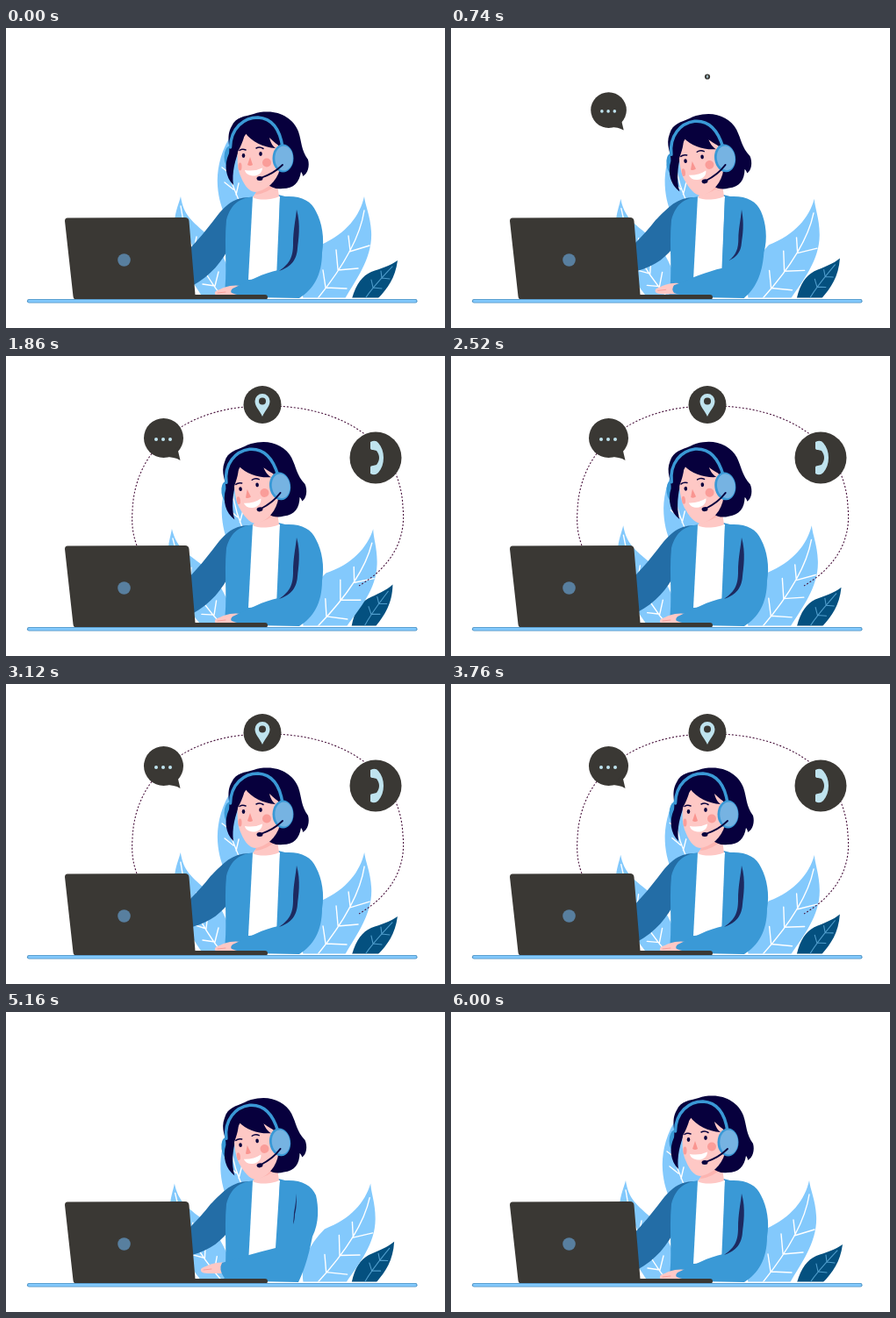
These frames come from a looping animation (500x342 px, 6020 ms). An HTML page:

```html
<!DOCTYPE html>
<html lang="en">
<head>
<meta charset="utf-8">
<title>Support agent</title>
<style>
  html, body { margin: 0; width: 100%; height: 100%; overflow: hidden; background: #fff; }
  svg { display: block; width: 100vw; height: 100vh; }
  .pale { fill: #83c9fc; }
  .vein { fill: none; stroke: #fff; stroke-width: 1.4; stroke-linecap: round; }
  .navy { fill: #07003d; }
  .blue { fill: #3a99d6; }
  .shade { fill: #236da6; }
  .skin { fill: #fec8c5; }
  .blush { fill: #f99590; }
  .dark { fill: #3a3834; }
  .ice { fill: #bfe3ee; }
  .line { fill: none; stroke-linecap: round; }
</style>
</head>
<body>
<svg viewBox="0 0 500 342">
  <defs>
    <clipPath id="ground"><rect width="500" height="307.5"/></clipPath>
    <path id="arc" d="M149 216C144 203 143 190 144 176C147 100 212 56 296 57C384 56 449 100 452 172C456 207 441 239 402 262"/>
    <mask id="reveal" maskUnits="userSpaceOnUse" x="0" y="0" width="500" height="342">
      <use id="wipe" href="#arc" fill="none" stroke="#fff" stroke-width="6"/>
    </mask>
  </defs>

  <g clip-path="url(#ground)">
    <g id="leafDark">
      <path fill="#04507f" d="M446 265C443 288 432 300 420 312H393C398 293 405 283 416 278C427 274 438 271 446 265Z"/>
      <path class="vein" style="stroke:#4f9ccb;stroke-width:1.1" d="M440 272C427 286 417 296 408 310M428 285L427 277M428 285L437 286M418 296L416 287M418 296L428 297"/>
    </g>
    <g id="leafRight">
      <path class="pale" d="M408 192C403 214 388 234 359 247C337 272 334 296 340 314H383C396 290 418 264 416 232C415 214 409 202 408 192Z"/>
      <path class="vein" d="M408 208C403 241 380 278 352 312M392 254L390 237M391 255L414 248M378 275L376 253M378 276L401 274M364 296L361 276M364 296L388 297"/>
    </g>
    <g id="leafMid">
      <path class="pale" d="M254 126C243 145 240 164 241 180C243 210 258 230 270 250L300 230C302 190 270 165 254 126Z"/>
      <path class="vein" d="M251 148C254 170 261 190 271 207M254 165L246 159M259 184L249 176M262 190L265 177"/>
    </g>
    <g id="leafLeft">
      <path class="pale" d="M199 192C202 213 212 220 224 231C242 246 256 270 262 312H228C206 283 190 250 192 220C193 208 197 200 199 192Z"/>
      <path class="vein" d="M199 203C204 242 222 276 248 309M214 254L217 238M228 279L230 262M228 279L213 274M238 294L242 278M238 294L224 292"/>
    </g>
  </g>

  <use id="dots" href="#arc" fill="none" stroke="#48123c" stroke-width="1.1" stroke-dasharray="2 2" mask="url(#reveal)"/>

  <g id="bubble">
    <circle class="dark" cx="179.5" cy="93.5" r="22.5"/>
    <path class="dark" d="M182 115C188 115 194 116 198.5 119L195 104Z"/>
    <g class="ice"><circle cx="171" cy="95" r="2"/><circle cx="179" cy="95" r="2"/><circle cx="187" cy="95" r="2"/></g>
  </g>
  <g id="pin">
    <circle class="dark" cx="292" cy="55.5" r="21.5"/>
    <path class="ice" d="M292 69C289 62 283.5 58 283.5 51.500A8.500 8.500 0 0 1 300.500 51.500C300.500 58 295 62 292 69Z"/>
    <circle class="dark" cx="292" cy="51.500" r="4"/>
  </g>
  <g id="phone">
    <circle class="dark" cx="421" cy="116" r="29.5"/>
    <path class="ice" d="M415 98q6-3 9 1C432 108 432 124 424 133q-4 4-9 1v-7q0-2 3-2l4-1c4-5 4-11 0-16l-4-1q-3 0-3-2z"/>
  </g>

  <path id="armLeft" class="shade"/>
  <path class="blue" d="M284 192C267 193 256 200 251 219C248 250 253 280 248 307H333L342 240L334 196L310 190Z"/>
  <path fill="#fff" d="M281 192H312L308 285L276 287Z"/>
  <path class="skin" d="M286 172H308L311 192C304 196 288 197 281 193L285 187Z"/>
  <path class="blush" opacity=".4" d="M285 185C295 184 303 179 307 173L308 178C302 185 293 189 284 190Z"/>

  <g id="head">
    <ellipse class="blue" cx="255" cy="147" rx="6.5" ry="12.5"/>
    <path class="navy" d="M297 95.5C313 95 328 104 333 118C337 130 336 139 344 150C346 157 344 166 338 169C338 167 337 165 336 164C334 176 328 183 315 183C308 184 302 182 298 178L266 138C261 150 257 165 259 179C250 170 248 156 254 143C256 135 250 124 257 112C262 101 272 101 282 98C287 96 292 95.5 297 95.5Z"/>
    <path class="skin" d="M265 132C263 146 263 157 266 166C270 177 276 187 284 187C296 185 308 176 312 161V137L301 119L277 116Z"/>
    <path class="navy" d="M261 147C266 137 271 129 272 119C280 130 293 136 307 137C304 135 301 130 300 125C305 130 310 134 315 136L309 111L285 103L262 112Z"/>
    <path class="line" stroke="#07003d" stroke-width="1.500" d="M266 139.500Q269 137.500 273 139M285 137Q289 135 293 137.500"/>
    <ellipse class="navy" cx="270.5" cy="145.5" rx="1.8" ry="2.4"/>
    <ellipse class="navy" cx="290" cy="143.5" rx="1.8" ry="2.4"/>
    <path class="blush" d="M278 147L281 156Q278 158 275 156Z"/>
    <circle class="blush" cx="297" cy="153.500" r="5" opacity=".85"/>
    <ellipse class="blush" cx="266.5" cy="158" rx="2" ry="4.500" opacity=".85"/>
    <path fill="#fff" d="M272 162Q283 164 292 159.500C292 166 286 169 281 168.500C276 168 273 166 272 162Z"/>
    <path class="line" stroke="#3a99d6" stroke-width="3.500" d="M255.5 136C256 114 271 102 287 102C303 103 312 116 315 136"/>
    <ellipse class="blue" cx="315.500" cy="148.500" rx="12" ry="16"/>
    <ellipse cx="316.500" cy="148.500" rx="10.200" ry="14" fill="#76b3e2"/>
    <path class="line" stroke="#07003d" stroke-width="1.800" d="M315 156Q305 166 290 171"/>
    <ellipse class="navy" cx="289" cy="171.500" rx="3.500" ry="2.500"/>
  </g>

  <g id="hand">
    <path class="skin" d="M268 294C256 292 247 296 239 300C236 303 239 306 246 306H268Z"/>
    <path class="line" stroke="#f99590" stroke-width=".8" d="M241 302L250 301"/>
  </g>
  <path id="armRight" class="blue"/>
  <path id="fold" fill="#1d2a60"/>

  <path class="dark" d="M70 216.500L204 216Q208 216 208.500 220L215.500 304H295Q298 304 298 307Q298 309.500 295 309.500H80Q77 309.500 76.500 306L67 220Q67 216.500 70 216.500Z"/>
  <circle cx="134.500" cy="264.500" r="7.300" fill="#587f9f"/>
  <rect x="24" y="309" width="444.500" height="4.600" rx="2.300" fill="#4a90c2"/>
  <rect x="25" y="309.700" width="442.500" height="3" rx="1.500" fill="#83c9fc"/>
</svg>

<script>
const LOOP = 6020;
const el = id => document.getElementById(id);
const arcLength = el('arc').getTotalLength();

// [time, value] steps, eased between neighbours
const tracks = {
  head: [[0, 0], [680, 1], [2420, 1], [3060, 0], [4360, 0], [5000, 1], [5280, 1], [5960, 0]],
  left: [[0, 0], [120, 0], [700, 1], [1250, 1], [1800, 0], [2400, 0], [3000, 1], [3150, 1], [3700, 0],
         [4400, 0], [5000, 1], [5250, 1], [5650, 0]],
  right: [[0, 0], [540, 0], [1060, 1], [1250, 1], [1800, 0], [4400, 0], [5000, 1], [5250, 1], [5650, 0]],
  bubble: [[640, 0], [765, 1], [4800, 1], [4920, 0]],
  pin: [[710, 0], [840, 1], [4720, 1], [4850, 0]],
  phone: [[790, 0], [910, 1], [4650, 1], [4770, 0]],
  arc: [[860, 0], [1240, 1], [4370, 1], [4680, 0]]
};

function at(name, t) {
  const keys = tracks[name];
  const i = keys.findIndex(k => k[0] > t);
  if (i < 0) return keys[keys.length - 1][1];
  if (i === 0) return keys[0][1];
  const [t0, a] = keys[i - 1], [t1, b] = keys[i];
  const u = (t - t0) / (t1 - t0);
  return a + (b - a) * u * u * (3 - 2 * u);
}

const turn = (id, deg, x, y) => el(id).setAttribute('transform', `rotate(${deg} ${x} ${y})`);
const shape = (id, d) => el(id).setAttribute('d', d);

function pop(id, x, y, s) {
  el(id).setAttribute('transform', `translate(${x} ${y}) scale(${s}) translate(${-x} ${-y})`);
  el(id).style.display = s > 0.01 ? '' : 'none';
}

function drawArms(l, r) {
  const mix = (a, b) => a + (b - a) * r;
  shape('armLeft', `M280 193C258 192 248 204 ${236 - 3 * l} ${220 - l}Q${224 - l} ${236 - 4 * l} 209 ${252 - 6 * l}
    L212 ${294 - 17 * l}C234 ${282 - 11 * l} 246 ${266 - 6 * l} 256 247Z`);
  shape('armRight', `M318 192C336 191 348 197 353 209
    C${mix(360, 356)} 222 ${mix(363, 357)} 240 ${mix(360, 349)} 256
    C${mix(360, 344)} 282 ${mix(350, 338)} 298 ${mix(334, 333)} 308
    L${mix(280, 285)} 307Q${mix(264, 256)} 305 ${mix(257, 248)} 302
    Q${mix(255, 242)} ${mix(300, 293)} ${mix(258, 246)} ${mix(297, 286)}
    C${mix(275, 262)} ${mix(289, 281)} ${mix(294, 287)} ${mix(279, 274)} ${mix(310, 307)} ${mix(276, 269)}
    L312 192Z`);
  shape('fold', `M331 207C${mix(336, 331)} 224 ${mix(333, 330)} ${mix(242, 226)} ${mix(332, 329)} ${mix(251, 231)}
    C${mix(331, 329)} ${mix(267, 236)} ${mix(322, 328)} ${mix(273, 239)} ${mix(311, 327)} ${mix(277, 242)}
    C${mix(324, 327)} ${mix(268, 239)} ${mix(327, 328)} ${mix(260, 234)} ${mix(327, 328)} ${mix(246, 228)}
    C${mix(327, 328)} 230 330 218 331 207Z`);
  el('hand').setAttribute('transform', `translate(${-16 * r} ${-8 * r})`);
}

function draw(t) {
  const sway = (1 - Math.cos(4 * Math.PI * t / LOOP)) / 2;
  turn('leafLeft', -6 * sway, 250, 305);
  turn('leafRight', 6 * sway, 355, 307);
  turn('leafDark', -7 * sway, 402, 315);
  turn('leafMid', 2.6 * sway, 275, 300);
  turn('head', -8 * at('head', t), 313, 173);
  drawArms(at('left', t), at('right', t));

  pop('bubble', 180, 94, at('bubble', t));
  pop('pin', 292, 55.5, at('pin', t));
  pop('phone', 421, 116, at('phone', t));
  const shown = at('arc', t);
  el('wipe').setAttribute('stroke-dasharray', `${arcLength * shown} ${arcLength + 1}`);
  el('dots').style.display = shown > 0 ? '' : 'none';
}

const start = performance.now();
function tick() {
  draw((performance.now() - start) % LOOP);
  requestAnimationFrame(tick);
}
tick();
</script>
</body>
</html>
```
